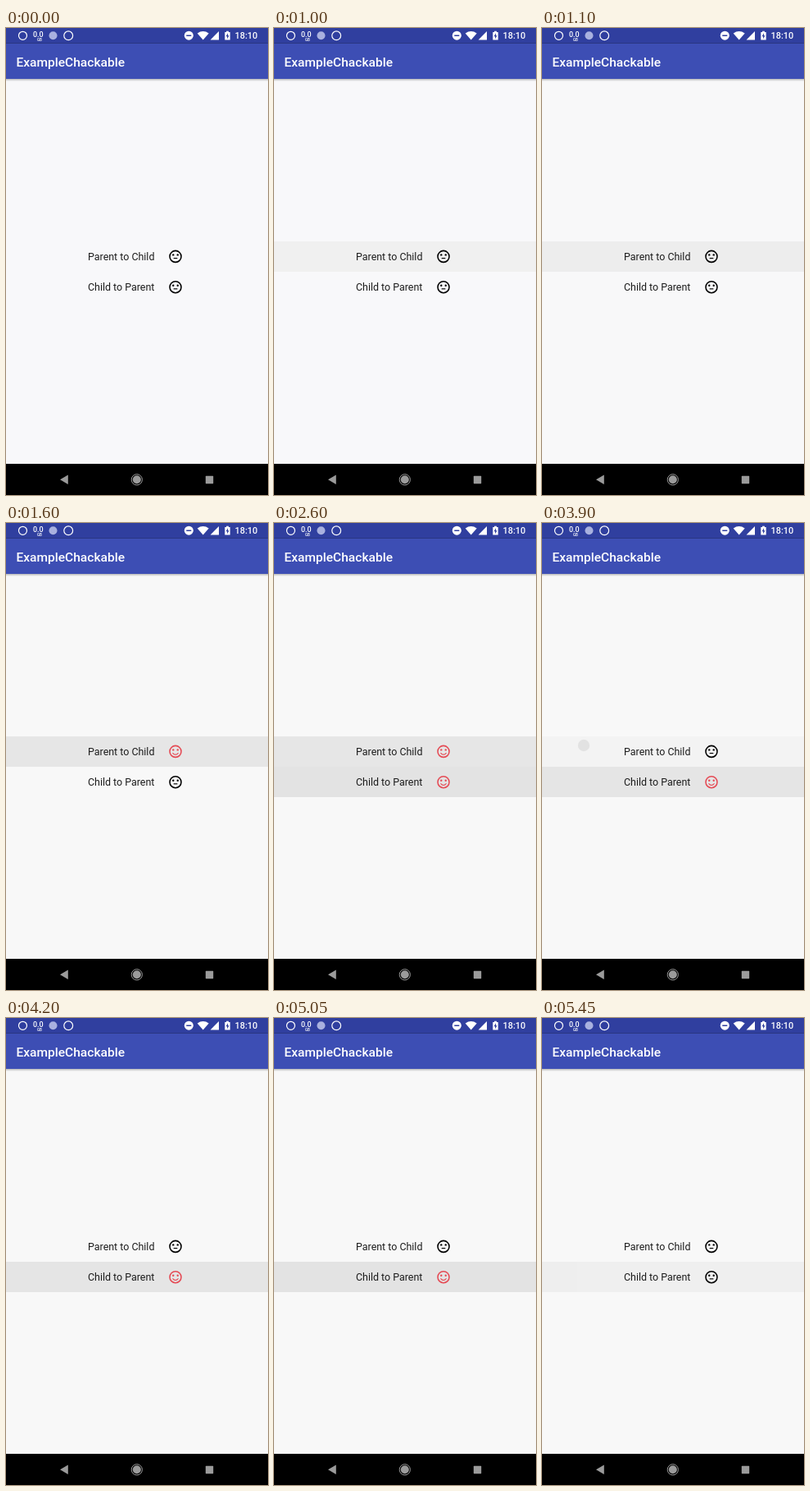
An HTML page that plays this animation: 320 px wide and 569 px high, repeating every 6400 ms.

```html
<!DOCTYPE html>
<html lang="en">
<head>
<meta charset="utf-8">
<title>ExampleChackable</title>
<style>
html, body { margin: 0; height: 100%; overflow: hidden; background: #000; }
svg { display: block; width: 100%; height: 100%; font-family: Roboto, sans-serif; }
</style>
</head>
<body>
<svg viewBox="0 0 320 569">
  <defs>
    <linearGradient id="shade" x2="0" y2="1">
      <stop stop-opacity=".26"/><stop offset="1" stop-opacity="0"/>
    </linearGradient>
    <g id="face">
      <circle r="9" fill="none" stroke="currentColor" stroke-width="2"/>
      <circle cx="-3.5" cy="-2.5" r="1.5"/><circle cx="3.5" cy="-2.5" r="1.5"/>
    </g>
    <clipPath id="clip0"><rect y="260" width="320" height="37"/></clipPath>
    <clipPath id="clip1"><rect y="297" width="320" height="37"/></clipPath>
  </defs>

  <rect id="page" y="62" width="320" height="469"/>
  <rect y="62" width="320" height="3" fill="url(#shade)"/>
  <rect width="320" height="18.5" fill="#303f9f"/>
  <rect y="18.5" width="320" height="43.5" fill="#3d4eb4"/>
  <text x="12.4" y="46.5" font-size="15.56" font-weight="500" fill="#fff">ExampleChackable</text>

  <g fill="#fff">
    <circle cx="20.5" cy="9.3" r="5" fill="none" stroke="#fff" stroke-width="1.2"/>
    <g text-anchor="middle" font-weight="500">
      <text x="39.3" y="10.5" font-size="9">0.0</text>
      <text x="41" y="16.3" font-size="4.5">GB</text>
    </g>
    <circle cx="57.5" cy="9.3" r="5" fill="#a9b1df"/>
    <circle cx="76.2" cy="9.3" r="5.4" fill="none" stroke="#fff" stroke-width="1.2"/>
    <circle cx="223.3" cy="9.2" r="5.5"/>
    <path d="M220.3 8.5h6v1.5h-6z" fill="#303f9f"/>
    <path d="M233.7 6.4q7-4.8 14 0L240.7 14.6z"/>
    <path d="M260 4v10.4h-10.4z"/>
    <path d="M267.3 5h1.8v-1.2h2.8v1.2h1.8v9.6h-6.4z"/>
    <path d="M271 6.2l-2.4 4h1.5v3l2.4-4h-1.5z" fill="#303f9f"/>
    <text x="279.6" y="13.3" font-size="10.9" font-weight="500">18:10</text>
  </g>

  <g id="rows"></g>

  <rect y="531" width="320" height="38"/>
  <g fill="#9b9b9b">
    <path d="M66 550.3l9.8-5.8v11.6z"/>
    <circle cx="159.8" cy="550.3" r="5"/>
    <circle cx="159.8" cy="550.3" r="6.6" fill="none" stroke="#9b9b9b"/>
    <rect x="243.8" y="545.8" width="9.4" height="9.4" rx=".6"/>
  </g>
</svg>
<script>
const LOOP = 6400, STEP = 50;
const $ = id => document.getElementById(id);
const clamp = x => Math.max(0, Math.min(1, x));
const ramp = (t, a, b) => clamp((t - a) / (b - a));
const mix = (a, b, k) => a + (b - a) * k;
const grey = v => `rgb(${v},${v},${v})`;

$('rows').innerHTML = ['Parent to Child', 'Child to Parent'].map((label, i) => `
  <g clip-path="url(#clip${i})">
    <rect id="fill${i}" y="${260 + 37 * i}" width="320" height="37"/>
    <rect id="edge${i}" y="${260 + 37 * i}" width="43" height="37" fill="#eee"/>
    <circle id="wave${i}" cx="${[51, 101][i]}" cy="${[271, 315.5][i]}"/>
  </g>
  <text x="100" y="${283.2 + 37.2 * i}" font-size="12.44" fill="#1c1c1c">${label}</text>
  <g transform="translate(207 ${278.4 + 37.3 * i}) scale(.778)">
    <g id="plain${i}" color="#000"><use href="#face"/><path d="M-3 2h6v1.5h-6z"/></g>
    <g id="smile${i}" color="#e54b55" fill="#e54b55"><use href="#face"/>
      <path d="M0 4c-1.48 0-2.75-.81-3.45-2h-1.67c.8 2.05 2.79 3.5 5.12 3.5s4.32-1.45 5.12-3.5h-1.67c-.7 1.19-1.97 2-3.45 2z"/></g>
  </g>`).join('');

// shade: row grey, or null when the page shows through; on: 0 neutral, 1 smiling
function drawRow(i, shade, on, age, reach) {
  $('fill' + i).setAttribute('fill', shade === null ? 'none' : grey(shade));
  $('plain' + i).setAttribute('opacity', 1 - on);
  $('smile' + i).setAttribute('opacity', on);
  $('wave' + i).setAttribute('r', reach * clamp(age / 200) ** 2.8);
  $('wave' + i).setAttribute('opacity', .066 * (1 - ramp(age, 100, 250)));
}

function draw(t) {
  const blue = mix(250, 248, ramp(t, 1000, 1350));
  $('page').setAttribute('fill', `rgb(248,248,${blue})`);

  let shade = null;
  if (t >= 750 && t < 3800) shade = mix(248, 230, ramp(t, 700, 1350));
  else if (t >= 3800 && t < 4000) shade = mix(230, 243, ramp(t, 3750, 3900));
  drawRow(0, shade, ramp(t, 1350, 1600) - ramp(t, 3750, 3900), t - 3800, 50);

  shade = null;
  if (t >= 2600) shade = mix(227, 229, ramp(t, 2600, 3200));
  if (t >= 5050) shade = mix(227, 239, ramp(t, 5050, 5300));
  drawRow(1, shade, +(t >= 2600) - ramp(t, 5050, 5200), t - 5050, 29);

  $('edge0').setAttribute('opacity', 0);
  $('edge1').setAttribute('opacity', +(t >= 5300));
}

function tick(now) {
  draw(Math.floor(now % LOOP / STEP) * STEP);
  requestAnimationFrame(tick);
}
draw(0);
requestAnimationFrame(tick);
</script>
</body>
</html>
```
